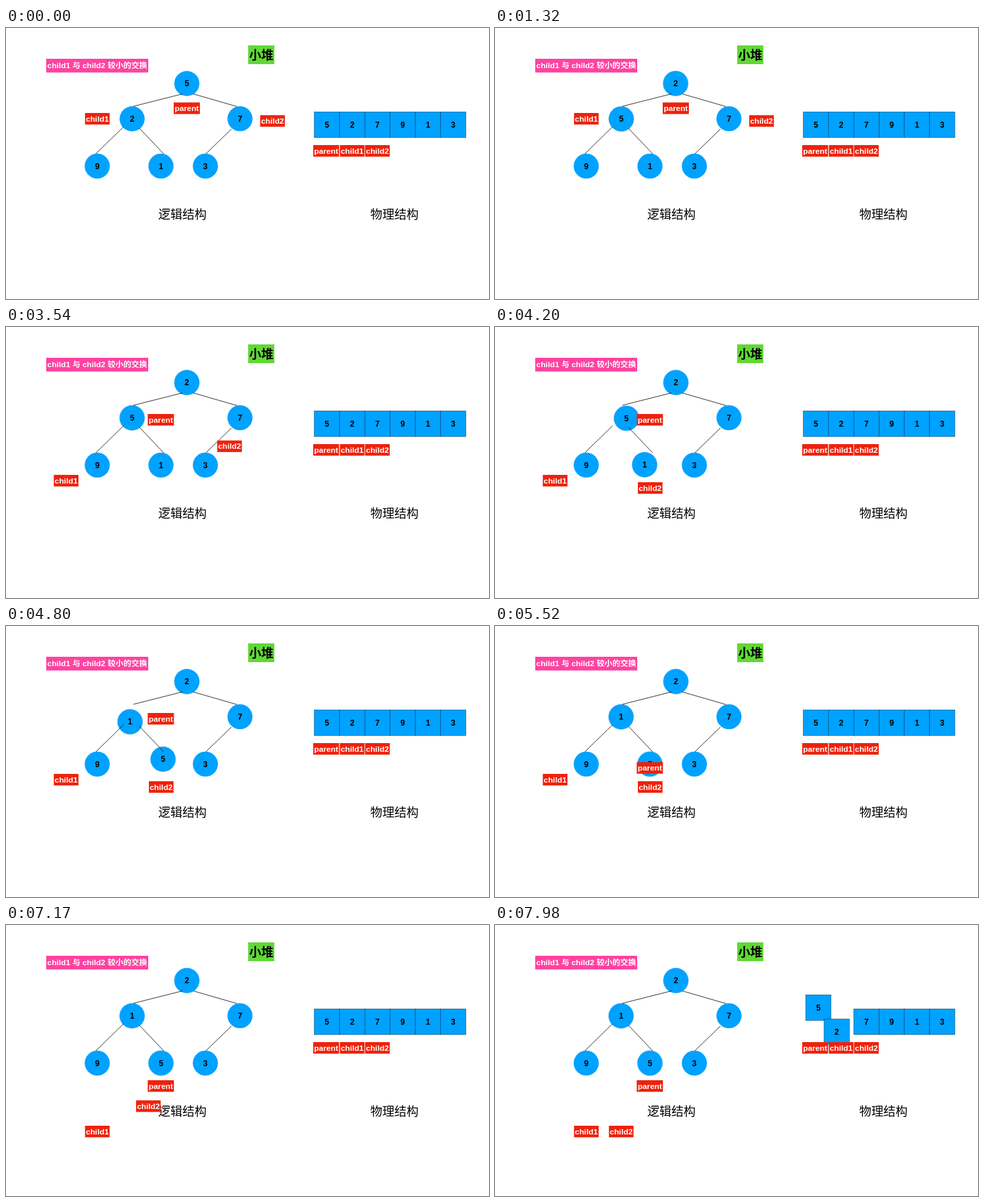
These frames come from a looping animation (720 by 405 pixels, 8 s). An HTML page with a canvas:

```html
<!DOCTYPE html>
<html lang="zh-CN">
<head>
<meta charset="utf-8">
<style>
html, body { margin: 0; width: 100%; height: 100%; overflow: hidden; background: #fff; }
canvas { display: block; width: 720px; height: 405px; }
</style>
</head>
<body>
<canvas id="stage" width="720" height="405"></canvas>
<script>
const ctx = document.getElementById('stage').getContext('2d');
const LOOP = 8000, TICK = 30, FIRST = 450, STEP = 900;
const BLUE = '#00a2ff', RED = '#ee220c', PINK = '#ff42a1', GREEN = '#61d836';
const FONT = '"Liberation Sans", "Noto Sans CJK SC", "Noto Sans CJK", sans-serif';
const CJK = '"Noto Sans CJK SC", "Noto Sans CJK", sans-serif';

// ease-in-out: cubic-bezier(.42, 0, .58, 1)
function ease(u) {
  if (u <= 0) return 0;
  if (u >= 1) return 1;
  let lo = 0, hi = 1;
  for (let i = 0; i < 24; i++) {
    const s = (lo + hi) / 2, r = 1 - s;
    if (1.26 * s * r * r + 1.74 * s * s * r + s * s * s < u) lo = s; else hi = s;
  }
  return lo * lo * (3 - 2 * lo);
}

const progress = (t, step) => ease((t - FIRST - step * STEP) / STEP);
const mix = (a, b, p) => [a[0] + (b[0] - a[0]) * p, a[1] + (b[1] - a[1]) * p];

// Path from a to b, bowed to the left of travel by h
function arc(a, b, h, p) {
  const dx = b[0] - a[0], dy = b[1] - a[1];
  const k = 4 * h * p * (1 - p) / Math.hypot(dx, dy);
  const [x, y] = mix(a, b, p);
  return [x + dy * k, y - dx * k];
}

// Bezier between neighbouring cells: out = first handle along travel, up = its height
function hop(a, b, out, up, p) {
  const d = b[0] - a[0], dir = Math.sign(d), r = 1 - p;
  const m = 3 * p * r * r, n = 3 * p * p * r;
  return [a[0] + dir * out * m + (d - dir * out) * n + d * p * p * p, a[1] - dir * up * (m + n)];
}

function text(str, x, y, size, weight, color, family = FONT) {
  ctx.font = `${weight} ${size}px ${family}`;
  ctx.fillStyle = color;
  ctx.textAlign = 'center';
  ctx.fillText(str, x, y);
}

function rect(x, y, w, h, color) {
  ctx.fillStyle = color;
  ctx.fillRect(x, y, w, h);
}

function node(n, [x, y], soft) {
  ctx.beginPath();
  ctx.arc(x, y, 18.7, 0, 7);
  ctx.fillStyle = BLUE;
  ctx.fill();
  if (soft) {
    ctx.strokeStyle = 'rgba(70,175,240,.55)';
    ctx.lineWidth = 1;
    ctx.stroke();
  }
  text(n, x, y + 4.3, 12, 'bold', '#000');
}

function cell(n, [x, y]) {
  rect(x - 18.85, y - 19.2, 37.7, 38.4, BLUE);
  ctx.strokeStyle = 'rgba(0,40,75,.7)';
  ctx.lineWidth = 0.7;
  ctx.strokeRect(x - 18.85, y - 19.2, 37.7, 38.4);
  text(n, x, y + 4.5, 12, 'bold', '#000');
}

function tag(str, [x, y]) {
  const w = str === 'parent' ? 39 : 36.7;
  rect(x, y, w, 17.3, RED);
  text(str, x + w / 2, y + 12.9, 11.8, 'bold', '#fff');
}

const ROOT = [269.6, 83], LEFT = [188, 135.8], RIGHT = [348.8, 135.6];
const LEAVES = [[136, 206.4], [231, 206.4], [297.2, 206.4]];
const EDGES = [[190, 117, 263, 98.5], [279, 98.5, 344, 117.3], [175.3, 147.5, 134, 188],
  [199, 150, 235, 188], [336, 151, 298, 188]];
const slot = i => [478.4 + 37.65 * i, 144.6];

// Stops of each label with the step that starts every move
const TAGS = [
  ['parent', [250, 111.3], [1, 211.3, 130], [5, 211.3, 232]],
  ['child1', [117.8, 127], [2, 71.3, 221], [6, 117.8, 300]],
  ['child2', [379, 130.3], [3, 213, 232], [7, 169.8, 300]]
];

function drawTree(t) {
  const a = progress(t, 0), b = progress(t, 4), swapped = a > 0;
  node(7, RIGHT);
  node(9, LEAVES[0]);
  node(3, LEAVES[2]);
  node(2, arc(LEFT, ROOT, 30.6, a), swapped);
  node(1, arc(LEAVES[1], LEFT, 30.6, b), b > 0);
  node(5, b > 0 ? arc(LEFT, LEAVES[1], 30.6, b) : arc(ROOT, LEFT, 23, a), swapped);

  ctx.strokeStyle = '#222';
  ctx.lineWidth = 0.9;
  ctx.beginPath();
  for (const [x1, y1, x2, y2] of EDGES) {
    ctx.moveTo(x1, y1);
    ctx.lineTo(x2, y2);
  }
  ctx.stroke();

  for (const [name, home, ...stops] of TAGS) {
    const at = stops.reduce((p, [step, x, y]) => mix(p, [x, y], progress(t, step)), home);
    tag(name, at);
  }
}

function drawArray(t) {
  const p = progress(t, 8);
  [7, 9, 1, 3].forEach((n, i) => cell(n, slot(i + 2)));
  cell(5, hop(slot(0), slot(1), -13.5, 34.8, p));
  cell(2, hop(slot(1), slot(0), -2.3, 24.9, p));
  rect(458, 175, 38.5, 17.3, RED);
  text('parent', 477.2, 187.9, 11.8, 'bold', '#fff');
  tag('child1', [497.7, 175]);
  tag('child2', [535.3, 175]);
}

function draw(t) {
  rect(0, 0, 720, 405, '#fff');
  rect(361, 26, 39, 28, GREEN);
  text('小堆', 380.5, 46.8, 18, 'bold', '#000', CJK);
  rect(60, 46, 152, 20.5, PINK);
  text('child1 与 child2 较小的交换', 136, 60.4, 11.8, 'bold', '#fff');
  text('逻辑结构', 263, 284.6, 18, 'normal', '#000', CJK);
  text('物理结构', 579, 284.6, 18, 'normal', '#000', CJK);
  drawTree(t);
  drawArray(t);
}

const start = performance.now();
function loop() {
  const t = (performance.now() - start) % LOOP;
  draw(Math.floor(t / TICK) * TICK);
  requestAnimationFrame(loop);
}
loop();
</script>
</body>
</html>
```
